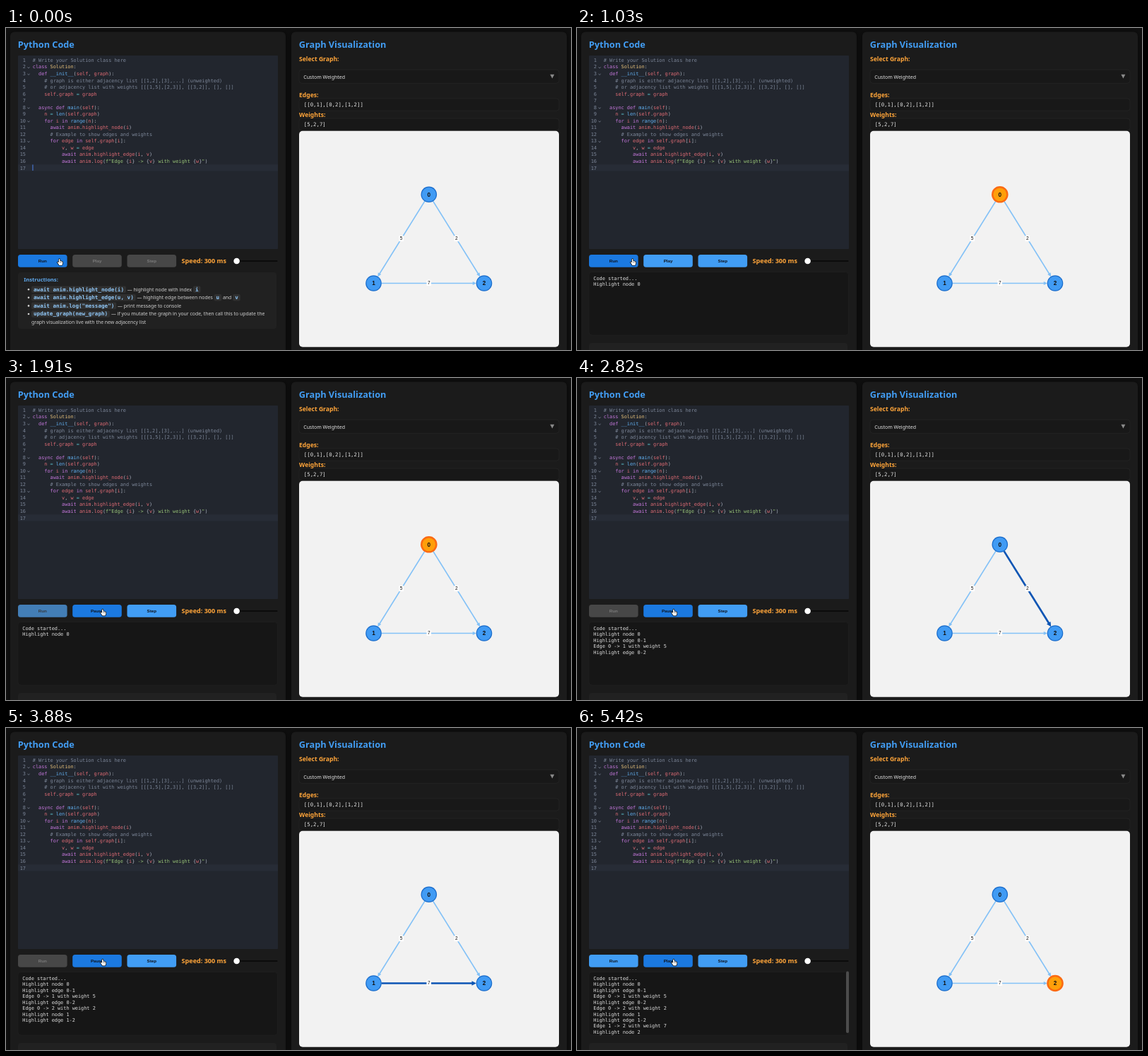
Write an HTML page with a canvas that moves like this. It is 800 px wide and 456 px high and loops after 5450 ms.

```html
<!DOCTYPE html>
<html lang="en">
<head>
<meta charset="utf-8">
<title>Graph Visualization</title>
<style>
html, body { margin: 0; width: 100%; height: 100%; overflow: hidden; background: #101010; }
canvas { display: block; }
</style>
</head>
<body>
<canvas id="stage" width="800" height="456"></canvas>
<script>
const ctx = document.getElementById('stage').getContext('2d');
const LOOP = 5450, RUN = 240, PLAY = 1830, STEP = 300, DONE = 4830;
const SANS = '"Noto Sans", "Open Sans", sans-serif';
const MONO = '"DejaVu Sans Mono", monospace';
const ARIAL = '"Liberation Sans", Arial, sans-serif';
const BLUE = [65, 157, 244], DARK = [27, 121, 224], GREY = [71, 71, 71];
const INK = [14, 20, 30], DIM = [122, 122, 122];

const code = [
  '# Write your Solution class here',
  'class Solution:',
  '  def __init__(self, graph):',
  '    # graph is either adjacency list [[1,2],[3],...] (unweighted)',
  '    # or adjacency list with weights [[[1,5],[2,3]], [[3,2]], [], []]',
  '    self.graph = graph',
  '',
  '  async def main(self):',
  '    n = len(self.graph)',
  '    for i in range(n):',
  '      await anim.highlight_node(i)',
  '      # Example to show edges and weights',
  '      for edge in self.graph[i]:',
  '          v, w = edge',
  '          await anim.highlight_edge(i, v)',
  '          await anim.log(f"Edge {i} -> {v} with weight {w}")',
  ''
];
const foldable = [2, 3, 8, 10, 13];

const rules = [
  [/^#/, '#7d8799'],
  [/^(f?"|.* )/, '#98c379'],
  [/^(class|def|async|await|for|in)$/, '#c678dd'],
  [/^Solution$/, '#e5c07b'],
  [/^(__init__|main|len|range)$/, '#61afef'],
  [/^=$/, '#56b6c2'],
  [/^\w/, '#e06c75'],
  [/./, '#abb2bf']
];
const lexer = /#.*|f"[^{]*|(?<=\})[^{"]+|"|\w+|[^\s\w]/g;

const log = [
  'Code started...', 'Highlight node 0', 'Highlight edge 0-1',
  'Edge 0 -> 1 with weight 5', 'Highlight edge 0-2', 'Edge 0 -> 2 with weight 2',
  'Highlight node 1', 'Highlight edge 1-2', 'Edge 1 -> 2 with weight 7', 'Highlight node 2'
];

const nodes = [[598.8, 235.8], [520.5, 361.5], [677, 361.5]];
const edges = [[0, 1, '5'], [0, 2, '2'], [1, 2, '7']];

const help = [
  [372.6, ['`await anim.highlight_node(i)', '— highlight node with index', '`i']],
  [384.2, ['`await anim.highlight_edge(u, v)', '— highlight edge between nodes', '`u', 'and', '`v']],
  [395.8, ['`await anim.log("message")', '— print message to console']],
  [407.4, ['`update_graph(new_graph)', '— if you mutate the graph in your code, then call this to update the']]
];

function text(s, x, y, font, color, align = 'left') {
  ctx.font = font;
  ctx.fillStyle = color;
  ctx.textAlign = align;
  ctx.fillText(s, x, y);
}

function box(x, y, w, h, r, fill, stroke) {
  ctx.beginPath();
  ctx.roundRect(x, y, w, h, r);
  ctx.fillStyle = fill;
  ctx.fill();
  if (stroke) {
    ctx.strokeStyle = stroke;
    ctx.lineWidth = 0.7;
    ctx.stroke();
  }
}

function disc(x, y, r, fill) {
  ctx.beginPath();
  ctx.arc(x, y, r, 0, Math.PI * 2);
  ctx.fillStyle = fill;
  ctx.fill();
}

function path(points, close) {
  ctx.beginPath();
  points.forEach(([x, y]) => ctx.lineTo(x, y));
  if (close) ctx.closePath();
}

const clamp = v => Math.max(0, Math.min(1, v));
const ease = v => v * v * (3 - 2 * v);

// Colour that fades to each new value over 200 ms
function fade(t, from, changes) {
  let c = from;
  for (const [at, to] of changes) {
    const k = ease(clamp((t - at) / 200));
    c = c.map((v, i) => v + (to[i] - v) * k);
  }
  return `rgb(${c.map(Math.round)})`;
}

function panel(x, title) {
  ctx.save();
  ctx.shadowColor = 'rgba(0,0,0,0.5)';
  ctx.shadowBlur = 8;
  box(x, 5.5, 390, 470, 6, '#1b1b1b');
  ctx.restore();
  text(title, x + 10.8, 28, `bold 12.7px ${SANS}`, '#429df3');
}

function editor(t) {
  const font = `6.87px ${MONO}`, lead = 9.54;
  box(17, 39, 368, 274, 1, '#22262e');
  ctx.fillStyle = '#272c36';
  ctx.fillRect(17, 193.2, 368, 9.3);
  ctx.font = font;
  const cw = ctx.measureText('0').width;
  code.forEach((line, i) => {
    const y = 47.9 + i * lead;
    text(i + 1, 28, y, font, '#7d8799', 'right');
    for (const m of line.matchAll(lexer)) {
      const color = rules.find(r => r[0].test(m[0]))[1];
      text(m[0], 37.8 + m.index * cw, y, font, color);
    }
    if (foldable.includes(i + 1)) {
      path([[30.4, y - 2], [32, y - 0.6], [33.6, y - 2]]);
      ctx.strokeStyle = '#7d8799';
      ctx.lineWidth = 0.8;
      ctx.stroke();
    }
  });
  if (t < RUN) {
    ctx.fillStyle = '#528bff';
    ctx.fillRect(37.5, 193.5, 0.9, 8.5);
  }
}

function button(x, label, fill, ink) {
  box(x, 321, 69.6, 17.8, 3.6, fill);
  text(label, x + 34.8, 332.2, `bold 6.2px ${ARIAL}`, ink, 'center');
}

function controls(t) {
  button(17, 'Run',
    fade(t, DARK, [[1400, BLUE], [PLAY, GREY], [DONE, BLUE]]),
    fade(t, INK, [[PLAY, DIM], [DONE, INK]]));
  const ink = fade(t, DIM, [[RUN, INK]]);
  button(94.2, t >= PLAY && t < DONE ? 'Pause' : 'Play',
    fade(t, GREY, [[RUN, BLUE], [1450, DARK]]), ink);
  button(171.5, 'Step', fade(t, GREY, [[RUN, BLUE]]), ink);
  text('Speed: 300 ms', 248.6, 332.6, `bold 9.05px ${SANS}`, '#ffa53a');
  box(321.5, 329, 63, 2, 1, '#0b0b0b');
  disc(326.6, 330, 4.3, '#fff');
}

function instructions() {
  box(17, 346, 366, 80, 4, '#212121');
  text('Instructions:', 25.2, 358.6, `bold 7.6px ${SANS}`, '#5fa9ee');
  const plain = `6.9px ${SANS}`, mono = `bold 7.6px ${MONO}`;
  for (const [y, parts] of help) {
    disc(32, y - 2.4, 1.3, '#cfcfcf');
    let x = 36;
    for (const part of parts) {
      const chip = part[0] === '`';
      const s = chip ? part.slice(1) : part;
      ctx.font = chip ? mono : plain;
      const w = ctx.measureText(s).width;
      if (chip) box(x, y - 7.2, w + 6, 9.6, 2, '#303030');
      text(s, x + (chip ? 3 : 0), y, chip ? mono : plain, chip ? '#8fc6f6' : '#cfcfcf');
      x += w + (chip ? 6 : 0) + 1.8;
    }
  }
  text('graph visualization live with the new adjacency list', 36, 419, plain, '#cfcfcf');
}

function output(step) {
  box(17, 345.5, 367.5, 89.5, 4, '#161616', '#222');
  log.slice(0, step + 2).forEach((s, i) =>
    text(s, 23.3, 356.7 + i * 8.47, `6.88px ${MONO}`, '#e0e0e0'));
  if (step >= 8) box(381, 344.5, 4, 87.5, 2, '#4c4c4c');
  box(17, 446, 366, 40, 4, '#212121');
}

function form() {
  const label = `bold 8.6px ${SANS}`, orange = '#ffa53a';
  text('Select Graph:', 415, 47.3, label, orange);
  box(415, 59, 368, 19.3, 4, '#181818', '#272727');
  text('Custom Weighted', 421.3, 71.5, `7px ${SANS}`, '#e2e2e2');
  path([[770.4, 65.8], [776.4, 65.8], [773.4, 71.4]], true);
  ctx.fillStyle = '#8a8a8a';
  ctx.fill();
  [['Edges:', '[[0,1],[0,2],[1,2]]', 97.8], ['Weights:', '[5,2,7]', 126]].forEach(([name, value, y]) => {
    box(415, y + 2, 368, 17.5, 4, '#181818', '#272727');
    text(name, 415, y, label, orange);
    text(value, 421.8, y + 13.2, `7.35px ${MONO}`, '#e4e4e4');
  });
}

function drawEdge([a, b, weight], lit) {
  const [ax, ay] = nodes[a], [bx, by] = nodes[b];
  const len = Math.hypot(bx - ax, by - ay);
  const ux = (bx - ax) / len, uy = (by - ay) / len;
  const at = (d, side = 0) => [ax + ux * d - uy * side, ay + uy * d + ux * side];
  const tip = len - 11, size = lit ? 6.5 : 5.2, half = lit ? 3.3 : 2.6;
  const color = lit ? '#0d55b4' : '#82c1f7';
  path([at(11), at(tip - size + 1)]);
  ctx.strokeStyle = color;
  ctx.lineWidth = lit ? 2.7 : 1.7;
  ctx.stroke();
  path([at(tip), at(tip - size, half), at(tip - size, -half)], true);
  ctx.fillStyle = color;
  ctx.fill();
  const [mx, my] = at(len / 2);
  box(mx - 3.3, my - 4.6, 6.6, 8.2, 1, '#fff');
  text(weight, mx, my + 1.6, `6.6px ${ARIAL}`, '#111', 'center');
}

function graph(active) {
  box(415, 145.8, 368, 306, 5, '#f2f2f2');
  edges.forEach(e => drawEdge(e, active === `e${e[0]}${e[1]}`));
  nodes.forEach(([x, y], i) => {
    const lit = active === 'n' + i;
    disc(x, y, lit ? 11.8 : 11.3, lit ? '#fb6a12' : '#1a6ccb');
    disc(x, y, lit ? 9.3 : 10.1, lit ? '#ff9f0a' : '#419bf4');
    text(i, x, y + 2.9, `bold 8.2px ${ARIAL}`, '#111', 'center');
  });
}

function hand(x, y) {
  ctx.save();
  ctx.translate(x, y);
  path([[-0.8, 0.4], [0, -0.3], [0.8, 0.4], [0.9, 3], [2.2, 2.8], [3.4, 3.3],
    [4.7, 4], [4.6, 6], [3.7, 8.7], [-0.2, 8.7], [-1.6, 6.6], [-2.9, 4.8],
    [-2.2, 4], [-0.8, 5]], true);
  ctx.lineJoin = 'round';
  ctx.strokeStyle = '#000';
  ctx.lineWidth = 1.3;
  ctx.stroke();
  ctx.fillStyle = '#fff';
  ctx.fill();
  ctx.lineWidth = 0.4;
  for (const fx of [0.9, 2.2, 3.4]) {
    path([[fx, 3.6], [fx, 5.2]]);
    ctx.stroke();
  }
  ctx.restore();
}

// The last highlight call stays lit while messages are logged
function highlight(step) {
  for (let i = step + 1; i > 0; i--) {
    const m = log[i].match(/^Highlight (n|e)\w+ (\d)-?(\d?)/);
    if (m) return m[1] + m[2] + m[3];
  }
  return '';
}

function draw(t) {
  const running = t >= RUN;
  const step = Math.max(0, Math.min(8, Math.floor((t - PLAY) / STEP)));
  ctx.fillStyle = '#101010';
  ctx.fillRect(0, 0, 800, 456);
  panel(6, 'Python Code');
  panel(404, 'Graph Visualization');
  editor(t);
  controls(t);
  if (running) output(step); else instructions();
  form();
  graph(running ? highlight(step) : '');
  const drift = ease(clamp((t - 670) / 300)), move = ease(clamp((t - 1260) / 400));
  hand(75.6 + 3 * drift + 58.2 * move, 327.2 + 0.6 * move);
}

function frame() {
  draw(performance.now() % LOOP);
  requestAnimationFrame(frame);
}
frame();
</script>
</body>
</html>
```
